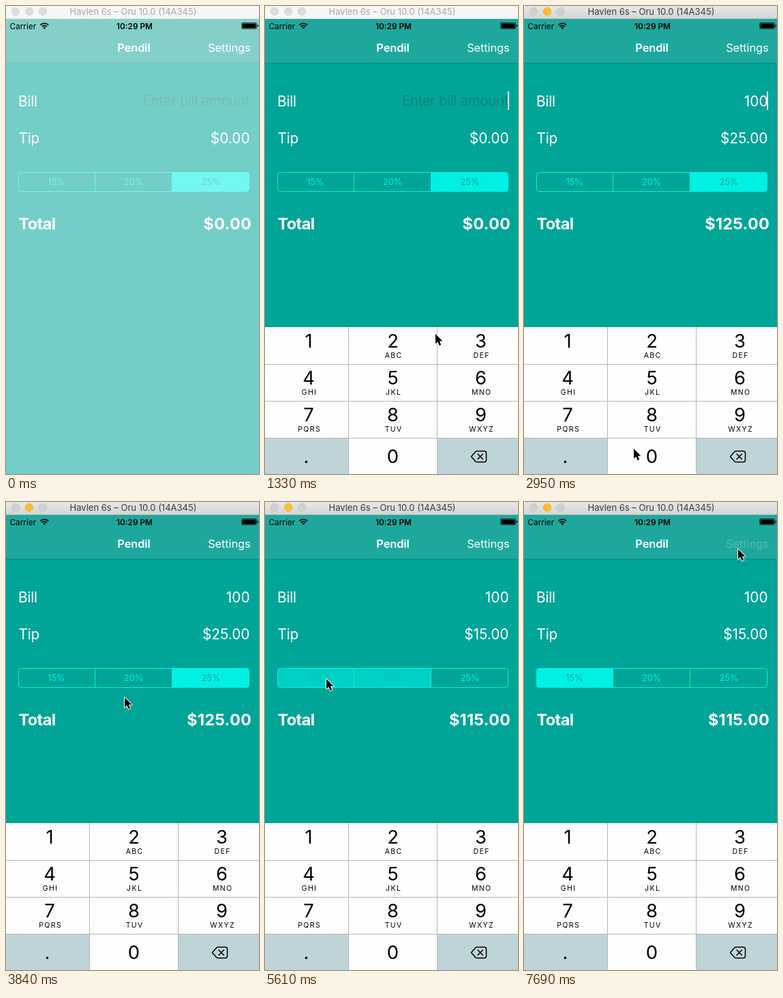
Recreate the animation shown at these times as an HTML page. Size 371 by 685 pixels, loop 7.99 s.

```html
<!DOCTYPE html>
<html lang="en">
<head>
<meta charset="utf-8">
<title>Tip calculator</title>
<style>
html, body { margin: 0; width: 100%; height: 100%; overflow: hidden; background: #00a598; }
svg { display: block; width: 371px; height: 685px; font-family: Inter, "Open Sans", sans-serif; font-optical-sizing: none; }
.mid { text-anchor: middle; }
.end { text-anchor: end; }
.row { font-size: 20.8px; font-weight: 400; fill: #fff; letter-spacing: -.2px; }
.num { letter-spacing: 0; }
.hint { fill: #07877d; letter-spacing: -.5px; }
.total { font-size: 23.5px; font-weight: 700; fill: #fff; }
.nav { font-size: 16.4px; fill: #fff; letter-spacing: -.1px; }
.bold { font-weight: 600; }
.status { font-size: 11.8px; }
.seg { font-size: 12.6px; }
.digit { font-size: 27.4px; }
.abc { font-size: 10.5px; letter-spacing: 1.4px; }
</style>
</head>
<body>
<svg id="stage" viewBox="0 0 371 685" xmlns="http://www.w3.org/2000/svg">
  <defs>
    <linearGradient id="bar" x2="0" y2="1">
      <stop offset="0" stop-color="#e8e8e8"/><stop offset="1" stop-color="#d3d3d3"/>
    </linearGradient>
  </defs>
  <rect width="371" height="685" fill="#00a598"/>
  <rect y="19" width="371" height="64" fill="#1ea89d"/>
  <rect y="83" width="371" height="1" fill="#0b8c83"/>
  <g id="segs"></g>
  <g id="keys"></g>
  <text class="row hint end" id="hint" x="357" y="146">Enter bill amount</text>
  <rect id="veil" y="19" width="371" height="666" fill="#fff" opacity=".45"/>

  <text class="nav bold mid" x="187.5" y="67">Pendil</text>
  <text class="nav end" id="settings" x="358.5" y="67">Settings</text>
  <text class="row" x="18" y="147">Bill</text>
  <text class="row" x="18.5" y="201">Tip</text>
  <text class="total" x="18.5" y="327" letter-spacing="-.6">Total</text>
  <text class="row num end" id="bill" x="357.5" y="146.5"></text>
  <text class="row num end" id="tip" x="357.5" y="201"></text>
  <text class="total end" id="total" x="360" y="327" letter-spacing=".2"></text>
  <rect id="caret" x="356" y="125" width="2" height="27" fill="#fff"/>

  <text class="status" x="5.5" y="33.5">Carrier</text>
  <g fill="none" stroke="#000" stroke-width="1.7">
    <path d="M50.3 27.8a8.6 8.6 0 0 1 12 0M52.6 30.2a5.3 5.3 0 0 1 7.4 0"/>
    <path d="M54.3 31.7a3 3 0 0 1 4 0L56.3 33.9Z" fill="#000" stroke="none"/>
  </g>
  <text class="status bold mid" x="188.5" y="33.5">10:29 PM</text>
  <rect x="345.5" y="24.5" width="22" height="9" rx="1.5" fill="none" stroke="#000" stroke-opacity=".6"/>
  <rect x="346.5" y="25.5" width="20" height="7" rx=".6"/>
  <path d="M368.5 27.3q1.6 .2 1.6 1.7t-1.6 1.7z"/>

  <rect id="chrome" width="371" height="19"/>
  <rect id="edge" y="18" width="371" height="1"/>
  <g id="lights"></g>
  <text class="mid" id="caption" x="186.5" y="13" font-size="13">Havlen 6s – Oru 10.0 (14A345)</text>
  <path id="arrow" d="M0 0V14.6L3.3 11.5 5.7 17 8.2 15.9 5.9 10.6H10.4Z" stroke="#fff" stroke-width="2" stroke-linejoin="round" paint-order="stroke"/>
</svg>
<script>
const $ = id => document.getElementById(id);
const LOOP = 7990, TICK = 147.6, LEAD = 5.5;
const TEAL = [0, 165, 152], CYAN = [0, 240, 228];

function add(parent, tag, attrs, text) {
  const el = document.createElementNS("http://www.w3.org/2000/svg", tag);
  for (const k in attrs) el.setAttribute(k, attrs[k]);
  if (text) el.textContent = text;
  parent.appendChild(el);
  return el;
}
const set = (id, k, v) => $(id).setAttribute(k, v);
const mix = (a, b, p) => `rgb(${a.map((v, i) => Math.round(v + (b[i] - v) * p))})`;

// Segmented control
const segPaths = [
  "M130.5 243.5H22.5a4 4 0 0 0-4 4V267.5a4 4 0 0 0 4 4H130.5Z",
  "M130.5 243.5H243.5V271.5H130.5Z",
  "M243.5 243.5H352.5a4 4 0 0 1 4 4V267.5a4 4 0 0 1-4 4H243.5Z"
];
const rates = [15, 20, 25];
const segs = segPaths.map((d, i) => ({
  fill: add($("segs"), "path", { d, stroke: mix(CYAN, CYAN, 0) }),
  label: add($("segs"), "text", { class: "seg mid", x: [74, 187, 300.5][i], y: 262 }, rates[i] + "%")
}));

// Keypad, drawn with its top edge at 0
const keys = $("keys"), cols = [64, 187.5, 316.5];
add(keys, "rect", { width: 371, height: 220, fill: "#fefefe" });
add(keys, "rect", { y: 162, width: 122.5, height: 58, fill: "#bfd4d8" });
add(keys, "rect", { x: 252.5, y: 162, width: 119, height: 58, fill: "#bfd4d8" });
add(keys, "path", {
  d: "M0 54.5H371M0 108.5H371M0 162.5H371M122.5 0V220M252.5 0V220",
  stroke: "#b3b8ba", fill: "none"
});
["", "ABC", "DEF", "GHI", "JKL", "MNO", "PQRS", "TUV", "WXYZ"].forEach((abc, i) => {
  const x = cols[i % 3], y = Math.floor(i / 3) * 54;
  add(keys, "text", { class: "digit mid", x, y: y + 30 }, String(i + 1));
  add(keys, "text", { class: "abc mid", x: x + 1.2, y: y + 45 }, abc);
});
add(keys, "text", { class: "digit mid", x: 187.5, y: 199 }, "0");
add(keys, "text", { class: "digit mid", x: 60.5, y: 199 }, ".");
add(keys, "path", {
  d: "M302.5 189.5L308.6 182.6Q309.6 181.5 311 181.5H321.5Q324.5 181.5 324.5 184.5V194.5Q324.5 197.5 321.5 197.5H311Q309.6 197.5 308.6 196.4ZM312 185.8L319.4 193.2M319.4 185.8L312 193.2",
  fill: "none", stroke: "#000", "stroke-width": 1.5, "stroke-linejoin": "round", "stroke-linecap": "round"
});

const lights = [14, 34, 54].map(cx => add($("lights"), "circle", { cx, cy: 8, r: 5.8, "stroke-width": .6 }));

// Pointer stops: tick, x, y
const stops = [
  [5, 374, 540], [9, 250, 480], [12, 62, 496], [14, 62, 496], [17, 161, 648],
  [21, 161, 648], [27, 175, 257], [32, 175, 257], [36, 90, 259], [39, 90, 259],
  [40, 172, 258], [41, 177, 256], [42, 177, 256], [46, 309, 54], [47, 314, 69], [54, 314, 69]
];
function pointer(k) {
  const i = stops.findIndex(s => s[0] > k);
  if (i < 1) return stops[i < 0 ? stops.length - 1 : 0];
  const a = stops[i - 1], b = stops[i];
  const p = (k - a[0]) / (b[0] - a[0]), e = p * p * (3 - 2 * p);
  return a.map((v, j) => v + (b[j] - v) * e);
}

// Caret is dark in these tick ranges, with a half step on the way out
const dark = [[5, 9], [12, 14], [23, 27], [30, 33], [37, 41], [45, 47], [50, 54]];
function caret(k) {
  if (k < 2) return 0;
  const d = dark.find(([a, b]) => k >= a && k < b);
  return !d ? 1 : k === d[0] ? .5 : 0;
}

const money = v => "$" + v.toFixed(2);

function draw(t) {
  const k = Math.min(53, Math.floor((t + LEAD) / TICK));
  const bill = k < 14 ? "" : k < 18 ? "1" : k < 20 ? "10" : "100";
  const pick = k < 30 ? 2 : k < 38 ? 1 : 0;
  const prev = k === 30 ? 2 : k === 38 ? 1 : -1;
  const tip = bill * rates[pick] / 100;
  const active = k >= 13;

  set("veil", "visibility", k < 2 ? "visible" : "hidden");
  set("keys", "visibility", k < 2 ? "hidden" : "visible");
  set("keys", "transform", `translate(0 ${k < 3 ? 474 : 470})`);

  segs.forEach((s, i) => {
    const on = i === prev || (i === pick && prev >= 0) ? .57 : +(i === pick);
    s.fill.setAttribute("fill", mix(TEAL, CYAN, on));
    s.label.setAttribute("fill", mix(CYAN, TEAL, on));
  });

  $("bill").textContent = bill;
  $("tip").textContent = money(tip);
  $("total").textContent = money(+bill + tip);
  set("hint", "visibility", bill ? "hidden" : "visible");
  set("caret", "opacity", caret(k));
  set("settings", "opacity", k < 52 ? 1 : .22);

  set("chrome", "fill", active ? "url(#bar)" : "#f6f6f6");
  set("edge", "fill", active ? "#b9bdbd" : "#e2e6e6");
  set("caption", "fill", active ? "#3c3c3c" : "#a8a8a8");
  lights.forEach((l, i) => {
    const lit = active && i === 1;
    l.setAttribute("fill", lit ? "#ffbe2f" : active ? "#d0d0d0" : "#dcdcdc");
    l.setAttribute("stroke", lit ? "#e0a028" : active ? "#bcbcbc" : "#cfcfcf");
  });

  const [, x, y] = pointer(k);
  set("arrow", "transform", `translate(${x.toFixed(1)} ${y.toFixed(1)})`);
  set("arrow", "visibility", k < 5 ? "hidden" : "visible");
}

const start = performance.now();
function loop() {
  draw((performance.now() - start) % LOOP);
  requestAnimationFrame(loop);
}
loop();
</script>
</body>
</html>
```
